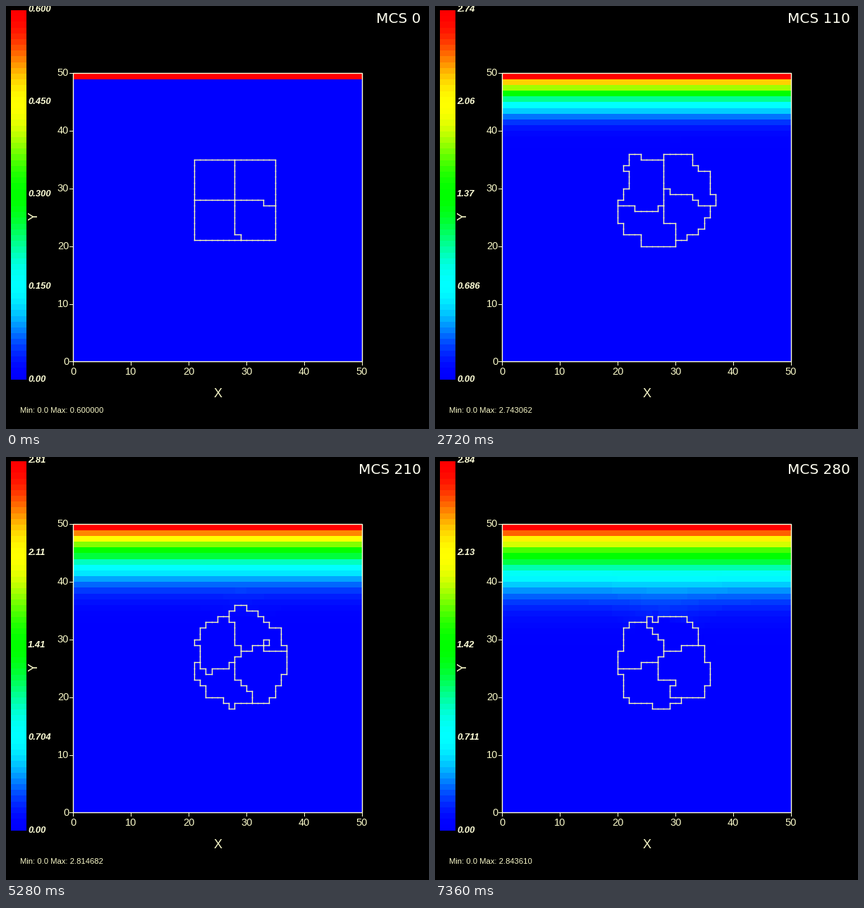
Recreate the animation shown at these times as a matplotlib script. Size 600 px wide and 600 px high, loop 7.44 s.

```python
import numpy as np
import matplotlib.pyplot as plt
from matplotlib.animation import FuncAnimation
from matplotlib.colors import ListedColormap, hsv_to_rgb

SIZE, DPI, TICK, LOOP = 600, 100, 40, 7440
PX = 72 / DPI
GRID, CELL = 50, 8.19
LEFT, BOTTOM = 95.5, 504.9
LAST_STEP = 280
CREAM, PALE, LINE = "#ffffd8", "#f8f8c8", "#ffffb4"

# Key points: time, step, cluster centre, and the two inner three-cell junctions
KEYS = np.array([
    (0, 0, 28, 28, 28, 28, 28, 28),
    (920, 30, 28.5, 27.5, 26, 28, 28, 29),
    (1960, 80, 28.5, 28, 28, 25, 28, 30),
    (3480, 140, 28, 28.5, 27, 27, 28, 29),
    (4440, 179, 29, 26.5, 27, 25, 30, 28),
    (6120, 239, 28.5, 27, 29, 25, 30, 29),
    (7240, 292, 27.5, 26, 27, 26, 28, 29),
])
WAVES = np.random.default_rng(4).normal(0, 0.8, (2, 6, 4))
GY, GX = np.mgrid[:GRID, :GRID] + 0.5


def ripple(waves, step):
    """Sum of drifting plane waves that roughens the membranes."""
    amp = 0.3 * min(1, step / 20)
    return amp * sum(np.sin(a * GX + b * GY + 0.4 * w * step + 4 * p)
                     for a, b, w, p in waves)


def cells_at(t, step, cx, cy, ax_, ay, bx, by):
    """Lattice labels: 0 outside, 1 to 4 for the quarters of a rounding square."""
    x, y = GX + ripple(WAVES[0], step), GY + ripple(WAVES[1], step)
    u = t / LOOP
    radius = 8 - np.exp(-step / 6)
    power = 2.2 + 18 * np.exp(-step / 6)
    inside = np.abs((x - cx) / radius) ** power + np.abs((y - cy) / radius) ** power < 1
    # Outer ends of the dividers drift slowly round the cluster
    level = np.interp(x, [cx - 8, ax_, bx, cx + 8], [28 - 3 * u, ay, by, 27.2 + 1.4 * u])
    split = np.interp(y, [cy - 8, ay, by, cy + 8], [28.7 + 3 * u, ax_, bx, 28.4 - 4 * u])
    return np.where(inside, 1 + (x > split) + 2 * (y < level), 0)


def diffuse(c, free):
    """One explicit step: source at the top wall, no flux through cells."""
    up = 0.1 * np.diff(c, axis=0) * (free[1:] & free[:-1])
    side = 0.1 * np.diff(c, axis=1) * (free[:, 1:] & free[:, :-1])
    new = c.copy()
    new[:-1] += up
    new[1:] -= up
    new[:, :-1] += side
    new[:, 1:] -= side
    new[-1] += 0.2 * (3 - c[-1])
    return new


def simulate():
    """A new state on every second tick, starting with the first."""
    c, done, states = np.zeros((GRID, GRID)), 0, []
    for t in [0, *range(TICK, LOOP, 2 * TICK)]:
        step, *shape = [np.interp(t, KEYS[:, 0], col) for col in KEYS[:, 1:].T]
        labels = cells_at(t, step, *shape)
        while done < round(step) + 1:
            c = diffuse(c, labels == 0)
            done += 1
        states.append((step, labels, c))
    return states


def rainbow(n=256):
    """Blue to red hue ramp with an S-curve on each channel."""
    hue = np.linspace(2 / 3, 0, n)
    rgb = hsv_to_rgb(np.c_[hue, np.ones(n), np.ones(n)])
    return ListedColormap((1 - np.cos(np.pi * rgb)) / 2)


def px(k):
    return LEFT - 0.5 + CELL * k


def py(k):
    return BOTTOM - 0.5 - CELL * k


def borders(labels):
    """Lattice edges between unlike labels as one broken line."""
    r, c = np.nonzero(np.diff(labels, axis=1))
    r2, c2 = np.nonzero(np.diff(labels, axis=0))
    x0, x1 = np.r_[c + 1, c2], np.r_[c + 1, c2 + 1]
    y0, y1 = np.r_[r, r2 + 1], np.r_[r + 1, r2 + 1]
    gap = np.full(len(x0), np.nan)
    return np.c_[px(x0), px(x1), gap].ravel(), np.c_[py(y0), py(y1), gap].ravel()


STATES = simulate()
CMAP = rainbow()

fig = plt.figure(figsize=(SIZE / DPI, SIZE / DPI), dpi=DPI, facecolor="black")
ax = fig.add_axes([0, 0, 1, 1])
ax.axis("off")


def mesh(xs, ys, values):
    return ax.pcolormesh(xs, ys, values, cmap=CMAP, vmin=0, vmax=1, antialiased=False)


def stroke(xs, ys, color, width=1):
    return ax.plot(xs, ys, color=color, lw=width * PX, snap=True,
                   solid_capstyle="projecting", solid_joinstyle="miter")[0]


def write(x, y, s, size, color=PALE, font="Liberation Sans", **kw):
    return ax.text(x, y, s, fontsize=size * PX, color=color, family=font, **kw)


edges = np.arange(GRID + 1)
field = mesh(px(edges) + 0.5, py(edges) + 0.5, np.zeros((GRID, GRID)))
mesh([7, 29], np.linspace(529.5, 6, 65), np.linspace(0, 1, 64)[:, None])

stroke(px(np.array([0, 50, 50, 0, 0])), py(np.array([0, 0, 50, 50, 0])), CREAM, 1.4)
for k in range(0, GRID + 1, 10):
    stroke([px(k)] * 2, [py(0), py(0) + 5], CREAM)
    stroke([px(0) - 5, px(0)], [py(k)] * 2, CREAM)
    write(px(k) + 0.5, 522.7, str(k), 14.5, ha="center")
    write(89, py(k) + 4.3, str(k), 14.5, ha="right")
write(300.5, 555, "X", 18, ha="center")
write(40.5, 298.5, "Y", 18, ha="center", va="center", rotation=90)

outline = stroke([], [], LINE, 1.4)
scale = [write(31, 532.6 - 131.2 * i, "", 13, CREAM, weight="bold", style="italic")
         for i in range(5)]
counter = write(588.7, 24.2, "", 20, "#fffff0", "DejaVu Sans", ha="right")
limits = write(20, 577, "", 11.2)
ax.set_xlim(0, SIZE)
ax.set_ylim(SIZE, 0)


def draw(i):
    step, labels, c = STATES[(i + 1) // 2]
    peak = c.max()
    field.set_array(c / peak)
    outline.set_data(*borders(labels))
    for j, text in enumerate(scale):
        text.set_text(f"{peak * j / 4:#.3g}")
    counter.set_text(f"MCS {min(LAST_STEP, 10 * round(step / 10))}")
    limits.set_text(f"Min: 0.0 Max: {peak:.6f}")
    return field, outline, counter, limits, *scale


anim = FuncAnimation(fig, draw, frames=LOOP // TICK, interval=TICK,
                     repeat=True, repeat_delay=0)
plt.show()
```
